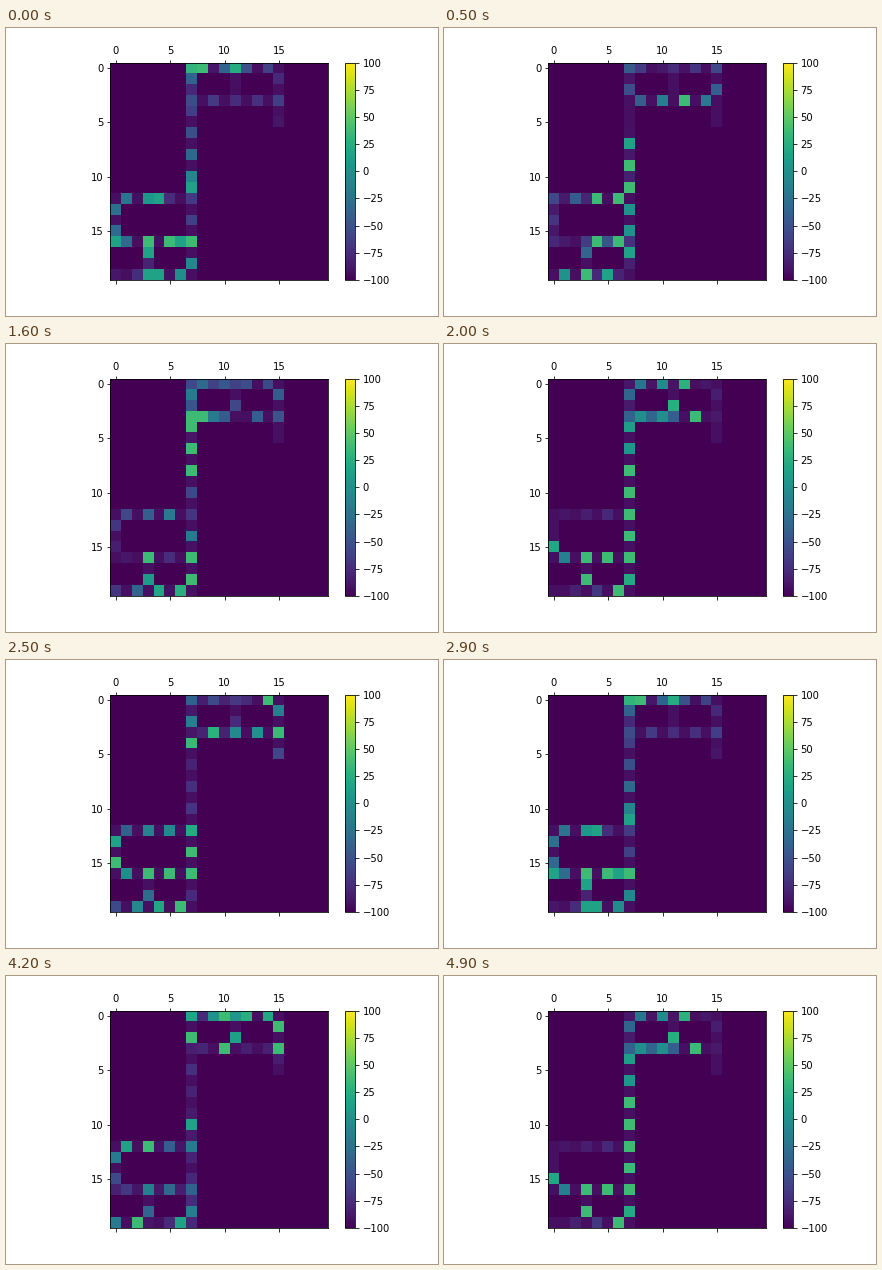
Write a matplotlib script that moves like this. It is 432 by 288 pixels and loops after 5 s.

```python
import matplotlib.pyplot as plt
import numpy as np
from matplotlib.animation import FuncAnimation

FRAMES, INTERVAL = 50, 100
SIZE = 20
LAP_FRAMES = 29     # every mover is back at its start after this many frames
STRIDE = 2          # cells per frame, so trails skip every other cell
SHIFT_PHASE = 8     # from here in a lap, movers tread on the skipped cells
PULSE, FADE = 115, 0.72
FAINT, PEAK = 8, 137

# Junctions and ends of the track network, as (column, row).
NODES = dict(
    A=(7, 0), B=(11, 0), C=(15, 0), D=(7, 3), E=(11, 3), F=(15, 3), G=(15, 5),
    H=(7, 12), I=(0, 12), J=(0, 16), K=(3, 16), L=(7, 16),
    M=(0, 19), N=(3, 19), O=(7, 19),
)

# Closed tours through the nodes, with the cell where each mover starts.
MOVERS = (
    ("ADHLJIHDEB", 11),
    ("ADHLJIHDEB", 31),
    ("LDABEDHIJ", 53),
    ("ABCFED", 4),
    ("ADFGFCB", 0),
    ("JIHL", 0),
    ("LONK", 7),
    ("KNMNOL", 1),
)


def cells_between(start, end):
    """Cells on a straight track, without the last one."""
    (x0, y0), (x1, y1) = NODES[start], NODES[end]
    dx, dy = np.sign(x1 - x0), np.sign(y1 - y0)
    length = max(abs(x1 - x0), abs(y1 - y0))
    return [(x0 + dx * i, y0 + dy * i) for i in range(length)]


def tour_cells(tour):
    pairs = zip(tour, tour[1:] + tour[0])
    return [cell for a, b in pairs for cell in cells_between(a, b)]


ROUTES = [(tour_cells(tour), start) for tour, start in MOVERS]

track_mask = np.zeros((SIZE, SIZE), dtype=bool)
for cells, _ in ROUTES:
    for x, y in cells:
        track_mask[y, x] = True


def mover_cell(cells, start, time):
    phase = time % LAP_FRAMES
    laps = round(STRIDE * LAP_FRAMES / len(cells))
    strides = laps * len(cells) * phase // (STRIDE * LAP_FRAMES)
    distance = start + STRIDE * strides + (phase >= SHIFT_PHASE)
    return cells[distance % len(cells)]


def heat_map(frame):
    heat = np.zeros((SIZE, SIZE))
    for age in range(LAP_FRAMES):
        for cells, start in ROUTES:
            x, y = mover_cell(cells, start, frame - age)
            heat[y, x] += PULSE * FADE**age
    return np.where(track_mask, np.clip(heat, FAINT, PEAK), 0) - 100


fig, ax = plt.subplots(figsize=(6, 4), dpi=72)
fig.subplots_adjust(left=0.125, right=0.9, bottom=0.125, top=0.88)
image = ax.matshow(heat_map(0), vmin=-100, vmax=100, cmap="viridis")
fig.colorbar(image)


def update(frame):
    image.set_data(heat_map(frame))
    return [image]


animation = FuncAnimation(fig, update, frames=FRAMES, interval=INTERVAL,
                          repeat=True, repeat_delay=0)
plt.show()
```
